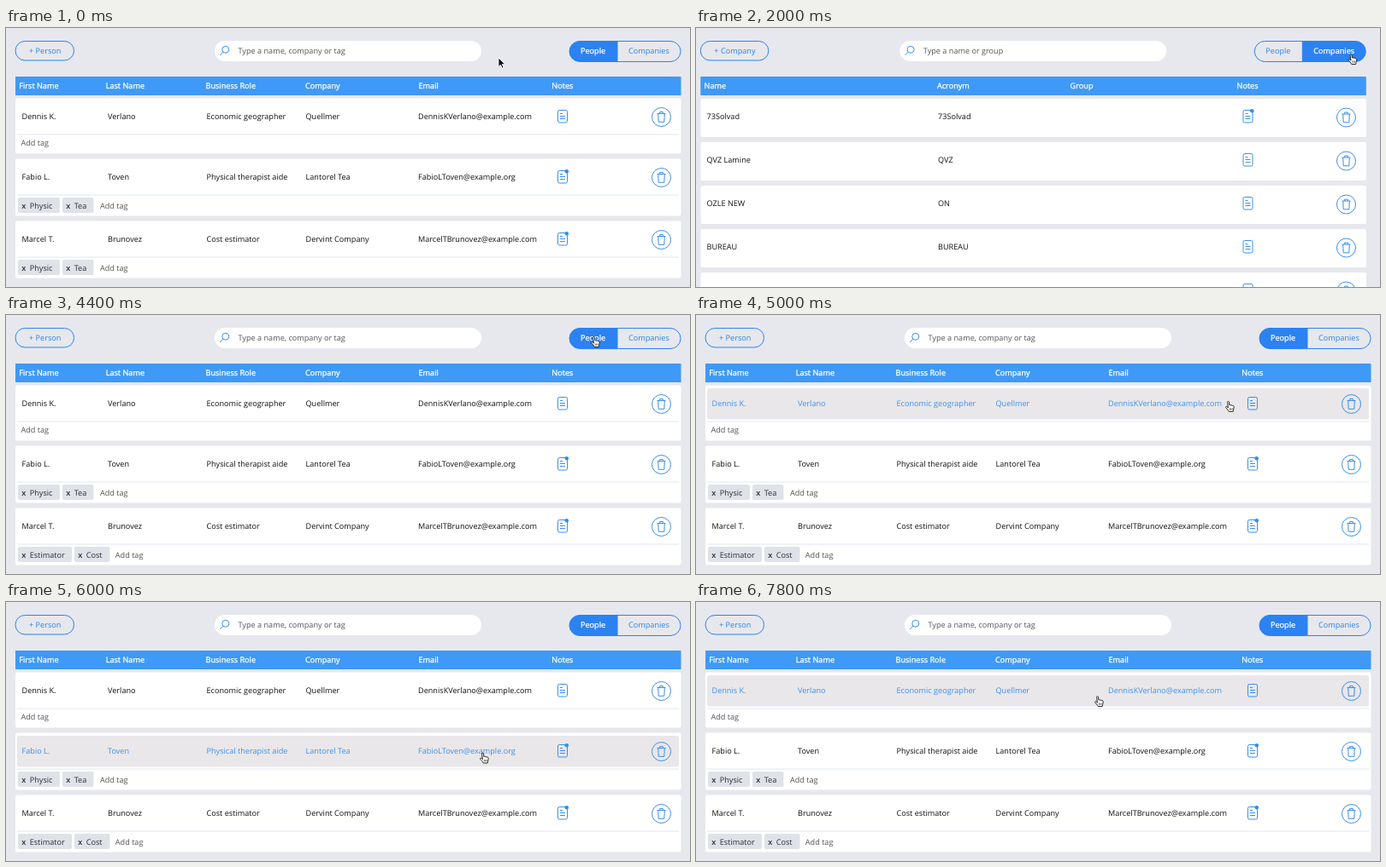
Animation of 800 by 304 pixels, one loop 8000 ms. Source, as an HTML page:

```html
<!DOCTYPE html>
<html lang="en">
<head>
<meta charset="utf-8">
<title>Contact list</title>
<style>
  html, body { margin: 0; width: 100%; height: 100%; overflow: hidden; background: #e7e8ed; }
  svg { display: block; width: 800px; height: 304px; }
  text { font: 9.15px "Open Sans", sans-serif; fill: #111; text-rendering: geometricPrecision; white-space: pre; }
  .head, .on text { fill: #fff; stroke: #fff; stroke-width: .3px; }
  .soft { fill: #555; }
  .tag { fill: #2b2e33; }
  .cross { font-weight: 600; }
  .blue { fill: #2b82e6; }
  .line { fill: none; stroke: #3b8ee6; stroke-width: 1; }
  .pill { fill: none; stroke: #2b82ef; stroke-width: 1; }
  .half path { fill: none; }
  .half text { fill: #2b82e6; }
  .half.on path { fill: #2b82f0; }
  .half.on text { fill: #fff; }
  .band { fill: none; }
  .hover .band { fill: #e9e7e9; }
  .hover .cell { fill: #3d92ec; }
</style>
</head>
<body>
<svg id="stage" viewBox="0 0 800 304"></svg>
<script>
const LOOP = 8000, STEP = 200;
const COMPANIES_FROM = 1600, COMPANIES_TO = 3400;
const ROW_TOPS = [82.5, 153.5, 226.5];

const people = [
  ["Dennis K.", "Verlano", "Economic geographer", "Quellmer", "DennisKVerlano@example.com"],
  ["Fabio L.", "Toven", "Physical therapist aide", "Lantorel Tea", "FabioLToven@example.org"],
  ["Marcel T.", "Brunovez", "Cost estimator", "Dervint Company", "MarcelTBrunovez@example.com"]
];
const companies = [["73Solvad", "73Solvad"], ["QVZ Lamine", "QVZ"], ["OZLE NEW", "ON"], ["BUREAU", "BUREAU"], ["", ""]];

// time, x, y of the pointer tip
const pointerKeys = [
  [0, 576, 35], [200, 576, 35], [1000, 766, 31], [2400, 766, 31],
  [3000, 687.5, 26], [4600, 687.5, 26], [5400, 557.5, 177.5], [6000, 557.5, 177.5],
  [6600, 555.5, 260.5], [7000, 555.5, 260.5], [7800, 469.5, 111], [LOOP, 469.5, 111]
];

const text = (x, y, str, cls = "cell") => `<text x="${x}" y="${y}" class="${cls}">${str}</text>`;
const box = (x, y, w, h, r, attrs) => `<rect x="${x}" y="${y}" width="${w}" height="${h}" rx="${r}" ${attrs}/>`;

const note = (x, y, marked) => `<g transform="translate(${x} ${y})">
  <rect x="-5.5" y="-7.5" width="11" height="14.5" rx="1.8" class="line"/>
  <path d="M-3 -3.5H0M-3 -.5H3M-3 2.5H3" class="line"/>
  ${marked ? '<circle cx="4.8" cy="-6.8" r="2.2" fill="#2f8df5"/>' : ""}</g>`;

const trash = (x, y) => `<g transform="translate(${x} ${y})" class="line">
  <circle r="11"/><path d="M-5 -4H5M-1.8 -4V-6H1.8V-4M-3.8 -4L-3.3 5.8H3.3L3.8 -4"/></g>`;

// The toolbar is shared; the views differ by a small sideways shift.
function toolbar(dx, button, buttonWidth, hint) {
  const at = n => n + dx;
  return box(at(11), 15.5, buttonWidth, 22.5, 11.2, 'class="pill"') +
    text(at(27), 30, button, "blue") +
    box(at(244), 15, 312, 24, 12, 'fill="#fff"') +
    `<g class="line" transform="translate(${dx})"><circle cx="256.8" cy="25.3" r="4"/><path d="M253.9 28.2L250.3 32"/></g>` +
    text(at(271.5), 30.3, hint, "soft") +
    `<g transform="translate(${dx})">
      <g class="half left"><path d="M715 15.5H671A12 12 0 0 0 671 39.5H715Z"/>${text(672, 30.3, "People", "")}</g>
      <g class="half right"><path d="M715 15.5H777A12 12 0 0 1 777 39.5H715Z"/>${text(728, 30.3, "Companies", "")}</g>
      ${box(659, 15.5, 130, 24, 12, 'class="pill"')}<path d="M715 15.5V39.5" class="pill"/></g>` +
    box(at(11), 57, 778.5, 22, 0, 'fill="#3f99f6"');
}

const headings = (names, xs) => names.map((name, i) => text(xs[i], 71, name, "head")).join("");

// Each tag: label, left edge, width
function tags(y, list, addX) {
  return list.map(([label, x, w]) => box(x, y - 12.5, w, 18, 2, 'fill="#dfe2e8"') +
    text(x + 4.2, y, "x", "tag cross") + text(x + 13.7, y, label, "tag")).join("") +
    text(addX, y, "Add tag", "soft");
}

const shortTags = y => tags(y, [["Physic", 14, 49], ["Tea", 66, 36.5]], 110);
const longTags = y => tags(y, [["Estimator", 14, 63], ["Cost", 80, 41.5]], 127.8);

function personRow(cells, i) {
  const top = ROW_TOPS[i], xs = [18.5, 119, 234.5, 350.5, 482];
  const tagY = top + 58;
  const tagLine = [
    tags(138.3, [], 17.5),
    shortTags(tagY),
    `<g id="oldTags">${shortTags(tagY)}</g><g id="newTags">${longTags(tagY)}</g>`
  ][i];
  return `<g class="row">${box(11, top, 778.5, i ? 67 : 65, 2, 'fill="#fff"')}
    ${box(13, top + 3.5, 774, 36.5, 3, 'class="band"')}
    <path d="M13 ${top + 42.5}H787" stroke="#dfe8f2"/>
    ${cells.map((c, k) => text(xs[k], top + 24.8, c)).join("")}
    ${note(651, top + 21.5, i > 0)}${trash(766.5, top + 22)}</g>${tagLine}`;
}

function companyRow([name, acronym], i) {
  const y = 83 + 51 * i;
  return box(5.5, y, 778.5, 45, 2, 'fill="#fff"') +
    text(12.5, y + 24.3, name) + text(283, y + 24.3, acronym) +
    note(645.5, y + 21, i === 0) + trash(760.5, y + 22);
}

const stage = document.getElementById("stage");
stage.innerHTML = `
  <rect width="800" height="304" fill="#e7e8ed"/>
  <g id="peopleView">${toolbar(0, "+ Person", 68.5, "Type a name, company or tag")}
    ${headings(["First Name", "Last Name", "Business Role", "Company", "Email", "Notes"], [15.3, 116.7, 233.5, 350, 482.5, 638.3])}
    ${people.map(personRow).join("")}</g>
  <g id="companyView">${toolbar(-5.7, "+ Company", 79.5, "Type a name or group")}
    ${headings(["Name", "Acronym", "Group", "Notes"], [9.6, 282, 437.6, 632.5])}
    ${companies.map(companyRow).join("")}</g>
  <g id="pointer" stroke-linejoin="round">
    <path id="arrow" d="M0 0V10.5L2.5 8.3L4.2 12L5.9 11.3L4.3 7.6H7.6Z" fill="#111" stroke="#fff" stroke-width=".8"/>
    <g id="hand" transform="translate(-3.5 -.8)" stroke="#111" stroke-width=".9">
      <path fill="#fff" d="M2.6 1.3C2.6 .2 4.4 .2 4.5 1.3L5 5C5.3 4.3 6.5 4.4 6.7 5.2C7.1 4.6 8.2 4.8 8.4 5.6C9 5.1 10.2 5.4 10.2 6.6C10.2 8.5 9.6 9.8 9.2 12.3H4.3C3.6 10.5 1.7 9 .7 7.7C.1 6.7 1.4 6 2.3 6.8L3.4 8Z"/>
      <path fill="none" stroke-width=".6" d="M5.2 8.3V10.6M6.7 8.3V10.6M8.2 8.3V10.6"/></g>
  </g>`;

const part = id => document.getElementById(id);
const all = cls => [...stage.querySelectorAll(cls)];
const show = (id, visible) => { part(id).style.display = visible ? "" : "none"; };
const rows = all(".row"), lefts = all(".left"), rights = all(".right");

function pointerAt(t) {
  const i = pointerKeys.findIndex(key => key[0] > t);
  const [t0, x0, y0] = pointerKeys[i - 1], [t1, x1, y1] = pointerKeys[i];
  const k = (t - t0) / (t1 - t0), e = k * k * (3 - 2 * k);
  return [x0 + (x1 - x0) * e, y0 + (y1 - y0) * e];
}

function draw(time) {
  const t = Math.floor(time % LOOP / STEP) * STEP;
  const [x, y] = pointerAt(t);
  const onCompanies = t >= COMPANIES_FROM && t < COMPANIES_TO;
  const dx = onCompanies ? -5.7 : 0;
  const onToggle = y > 15 && y < 40 && x > 659 + dx && x < 789 + dx;
  const onLeft = onToggle && x < 715 + dx;
  const hovered = onCompanies ? -1 : ROW_TOPS.findIndex(top => y > top + 3 && y < top + 40);

  show("peopleView", !onCompanies);
  show("companyView", onCompanies);
  show("oldTags", t < COMPANIES_FROM);
  show("newTags", t >= COMPANIES_FROM);
  lefts.forEach(el => el.classList.toggle("on", !onCompanies || onLeft));
  rights.forEach(el => el.classList.toggle("on", onCompanies || onToggle && !onLeft));
  rows.forEach((el, i) => el.classList.toggle("hover", i === hovered));

  const hand = onToggle || hovered >= 0;
  show("hand", hand);
  show("arrow", !hand);
  part("pointer").setAttribute("transform", `translate(${x} ${y})`);
}

const start = performance.now();
function tick() {
  draw(performance.now() - start);
  requestAnimationFrame(tick);
}
tick();
</script>
</body>
</html>
```
